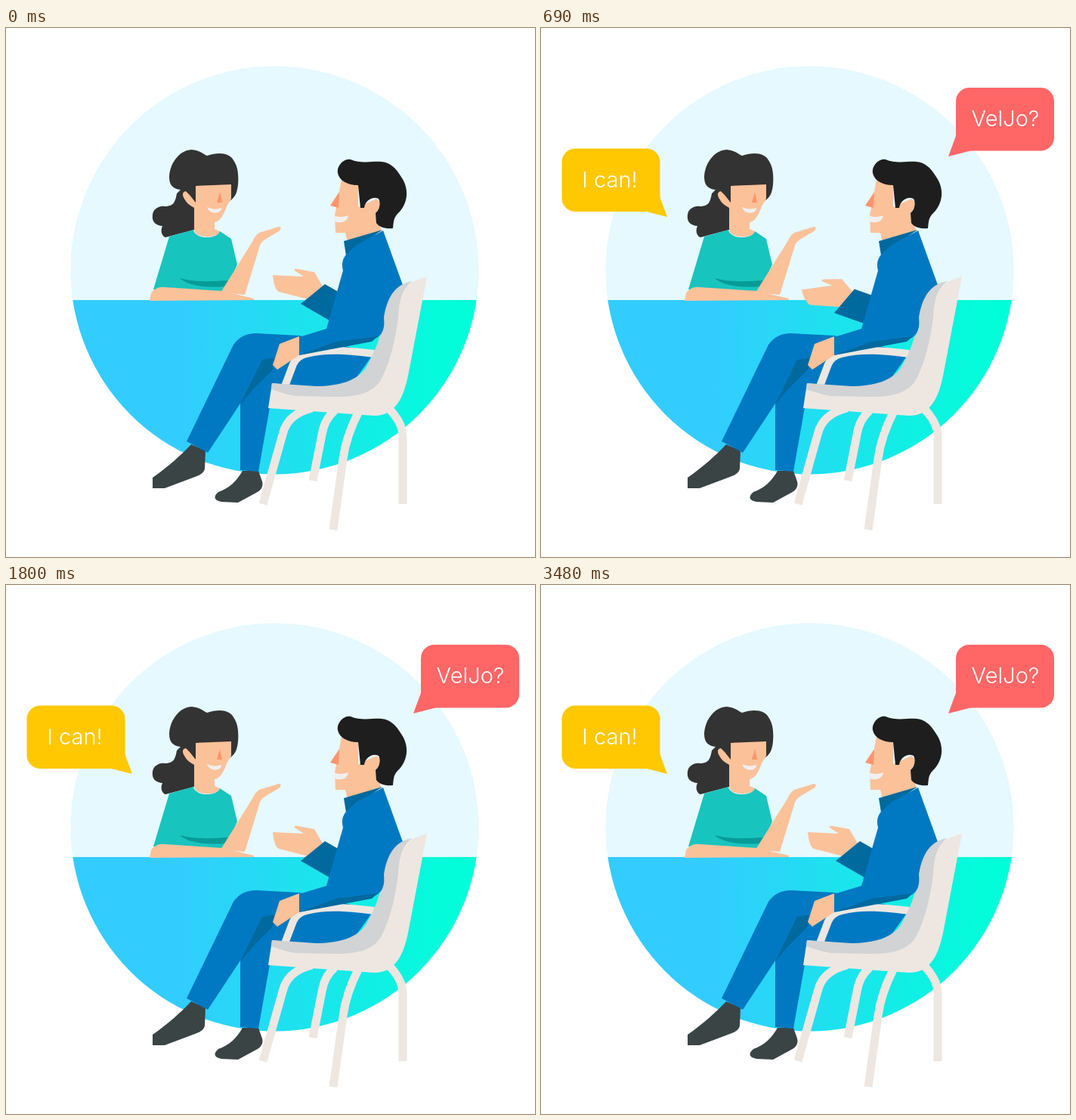
An HTML page for the animation above (3600 ms loop, 700 by 700 pixels).

```html
<!DOCTYPE html>
<html lang="en">
<head>
<meta charset="utf-8">
<title>Conversation</title>
<style>
  html, body { margin: 0; width: 100%; height: 100%; overflow: hidden; background: #fff; }
  svg { display: block; width: 100vw; height: 100vh; }
  text { font: 300 29px Inter, Lato, sans-serif; fill: #fff; text-anchor: middle; }
  .skin { fill: #fbc199; }
  .nose { fill: #ff946b; }
  .teeth { fill: #f0f0f0; }
  .blue { fill: #0079c2; }
  .navy { fill: #00699e; }
  .shoe { fill: #3b4445; }
  .frame { fill: none; stroke: #eee7e1; stroke-width: 11; }
</style>
</head>
<body>
<svg viewBox="0 0 700 700">
  <defs>
    <linearGradient id="sea" gradientUnits="userSpaceOnUse" x1="225" x2="605" y1="0" y2="0">
      <stop stop-color="#33ccff"/>
      <stop offset="1" stop-color="#00ffd8"/>
    </linearGradient>
    <clipPath id="low"><path d="M0 360H700V700H0Z"/></clipPath>
  </defs>
  <circle cx="355.5" cy="320.500" r="270" fill="#e5f9ff"/>
  <circle cx="355.5" cy="320.500" r="270" fill="url(#sea)" clip-path="url(#low)"/>

  <!-- woman -->
  <path fill="#333" d="M216 197C217 176 232 161 246 161C257 162 261 167 266 169C281 164 296 165 301 175C307 183 308 195 307 207C306 218 303 224 297 228L280 240L249 238V267L211 277C206 275 204 268 207 262C196 261 193 255 194 247C195 239 203 235 210 236C222 236 224 230 226 219L231 214C221 213 216 208 216 197Z"/>
  <path class="skin" d="M238 216C233 217 233 221 236 226C239 232 244 235 249 238V267C250 279 280 279 283 269L276 266V257C284 256 289 245 292 236L298 226V207L251 209V231L243 221Z"/>
  <path class="nose" d="M283 217L286 231H279Z"/>
  <path class="teeth" d="M266 237C272 240 280 240 285 238C285 247 269 247 266 237Z"/>
  <path fill="#18c4be" d="M216 276L248 267C250 280 280 280 283 269L298 279L306 313L290 349L195 346Z"/>
  <path fill="#079b98" d="M230 331C250 337 275 335 296 334L290 342C265 344 240 341 230 331Z"/>
  <path class="skin" d="M190 361L192 351C196 345 202 342 210 343L286 348L328 358V360Z"/>
  <path id="herArm" class="skin" d="M284 350L326 283C329 276 333 271 338 270L361 263C365 263 364 267 361 269L344 279C338 283 336 286 335 291L316 353Z"/>

  <!-- man -->
  <g id="hisArm">
    <path class="skin" d="M353 327L394 329L382 321Q380 318 386 319L408 323L419 342L400 359L361 349Q355 346 353 327Z"/>
    <path class="navy" d="M390 365L422 339L450 355L428 387Z"/>
  </g>
  <path class="skin" d="M444 200L466 207V237L490 226L497 232L489 246L497 269L452 284L449 271L436 271L435 248L440 222Z"/>
  <path fill="#1e1e1e" d="M439 192C437 182 448 172 456 174C470 180 485 176 497 177C511 178 519 190 526 202C533 216 531 231 521 243C512 251 513 257 512 265C503 266 494 264 490 258L489 245C495 240 496 231 493 226C485 222 475 229 474 238H469L466 208C452 208 441 202 439 192Z"/>
  <path class="nose" d="M441 217L429 235L440 238Z"/>
  <path class="teeth" d="M434 248C440 251 448 250 453 248C452 257 442 259 434 256Z"/>

  <path class="shoe" d="M245 551L264 559L263 583C262 589 256 592 250 594L210 609H194V595C215 580 232 565 245 551Z"/>
  <path class="shoe" d="M313 586H334L339 600C341 607 337 612 331 615L307 628L285 627C275 625 274 620 281 614C295 609 305 600 313 586Z"/>
  <path class="blue" d="M388 407L331 404C318 404 308 409 301 419L239 547L267 562L310 497V585L334 587L352 485L450 482L487 430Z"/>
  <path class="navy" d="M339 439L357 436L353 452L327 478L310 498Z"/>

  <!-- chair -->
  <path class="frame" d="M340 630L366 538Q372 511 405 503M406 599L418 538Q421 518 435 506M433 664L446 570Q450 540 467 507M525 630V540Q525 522 506 503"/>
  <path class="frame" style="stroke-width:10" d="M369 474L380 445Q385 434 398 431C425 424 455 427 487 431"/>
  <path class="navy" d="M447 282L498 267L465 290L450 301Z"/>
  <path class="blue" d="M499 268L525 340L500 396Q498 407 488 411L388 433V409L424 398L446 321C443 310 447 303 451 299L464 287Z"/>
  <path class="navy" d="M388 433L437 415L492 408L484 415Z"/>
  <path class="skin" d="M388 408L362 418L353 446L359 452L388 433Z"/>
  <path fill="#eee7e1" d="M557 329L533 455C527 488 516 513 487 513L347 503L352 470L440 480L500 440L515 360Q525 337 557 329Z"/>
  <path fill="#d1d3d4" d="M352 470L410 474C440 474 466 467 477 448C487 430 491 420 494 409C500 400 501 395 500 383C504 356 516 338 538 335C522 345 520 366 519 383C514 420 508 440 498 462C488 483 465 488 437 488L384 487Q370 485 351 478Z"/>

  <g id="ask">
    <rect x="549" y="79" width="130" height="83.500" rx="18" fill="#f66"/>
    <path fill="#f66" d="M549 143L539 170L570 162Z"/>
    <text x="614.5" y="129.500">VelJo?</text>
  </g>
  <g id="reply">
    <rect x="27.500" y="159.500" width="130" height="83.500" rx="18" fill="#ffc800"/>
    <path fill="#ffc800" d="M157 223L167 250L136 242Z"/>
    <text x="91" y="211">I can!</text>
  </g>
</svg>
<script>
  const LOOP = 3600, STEP = 30, SWING = 480, POP = 300;
  const part = id => document.getElementById(id);
  const ramp = (t, start, length) => Math.min(1, Math.max(0, (t - start) / length));
  const ease = p => p * p * (3 - 2 * p);
  const swing = (t, out, back) => ease(ramp(t, out, SWING)) - ease(ramp(t, back, SWING));

  const turn = (id, angle, x, y) =>
    part(id).setAttribute("transform", `rotate(${angle} ${x} ${y})`);

  function pop(id, t, start, x, y) {
    const s = ramp(t, start, POP);
    part(id).setAttribute("transform", `translate(${x} ${y}) scale(${s}) translate(${-x} ${-y})`);
    part(id).style.display = s ? "" : "none";
  }

  function draw(now) {
    const t = Math.min(LOOP - 4 * STEP, Math.floor(now % LOOP / STEP) * STEP);
    pop("ask", t, 0, 537, 172);
    pop("reply", t, 390, 170, 252);
    turn("hisArm", -10.5 * swing(t, 0, 840), 454, 382);
    turn("herArm", 7 * (swing(t, 840, 1320) + swing(t, 2520, 3000)), 292, 352);
  }

  const begin = performance.now();
  function tick() {
    draw(performance.now() - begin);
    requestAnimationFrame(tick);
  }
  tick();
</script>
</body>
</html>
```
